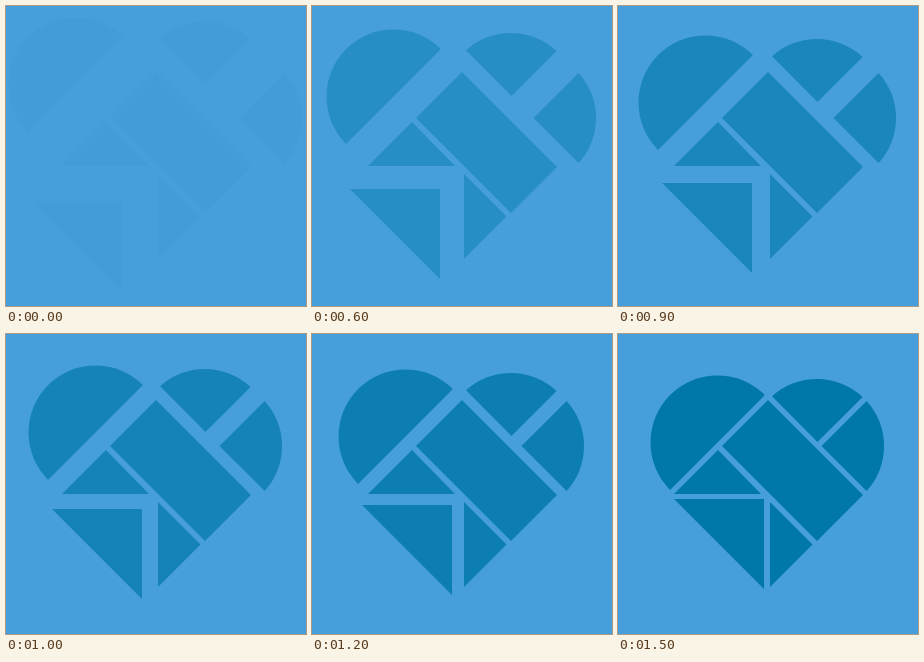
An HTML page that plays this animation: 300x300 px, repeating every 1600 ms.

```html
<!DOCTYPE html>
<html lang="en">
<head>
<meta charset="utf-8">
<title>Tangram heart</title>
<style>
  html, body { margin: 0; width: 100%; height: 100%; overflow: hidden; background: #469fdc; }
  svg { display: block; width: 100vw; height: 100vh; fill: #0077aa; }
</style>
</head>
<body>
<svg viewBox="0 0 300 300">
  <g id="heart">
    <path d="M150 66L245 161L199 207L104 112Z"/>
    <path d="M100 116L143 160H56Z"/>
    <path d="M152 168L194.5 210.5L152 253Z"/>
    <path data-dir="-1 -1" d="M52.1 155.9A67 67 0 0 1 146.9 61.1Z"/>
    <path data-dir="0 -1" d="M199.5 108L154 62.3A67 67 0 0 1 244.6 62.9Z"/>
    <path data-dir="1 0" d="M203.5 112L248.6 66.9A67 67 0 0 1 248.6 157.1Z"/>
    <path data-dir="-1 1" d="M56 165H146V255Z"/>
  </g>
</svg>
<script>
  const STEP = 100, STEPS = 16, HOLD = 4, TRAVEL = 2;
  const heart = document.getElementById('heart');
  const movers = [...heart.querySelectorAll('[data-dir]')].map(el => ({
    el, dir: el.dataset.dir.split(' ').map(Number)
  }));

  function draw(time) {
    const tick = Math.floor(time / STEP) % STEPS;
    const step = tick < HOLD ? 0 : tick;
    const gap = (STEPS - 1 - step) * TRAVEL;
    heart.setAttribute('opacity', (step + 1) / STEPS);
    for (const { el, dir: [x, y] } of movers) {
      el.setAttribute('transform', `translate(${x * gap} ${y * gap})`);
    }
  }

  const start = performance.now();
  function loop() {
    draw(performance.now() - start);
    requestAnimationFrame(loop);
  }
  loop();
</script>
</body>
</html>
```
